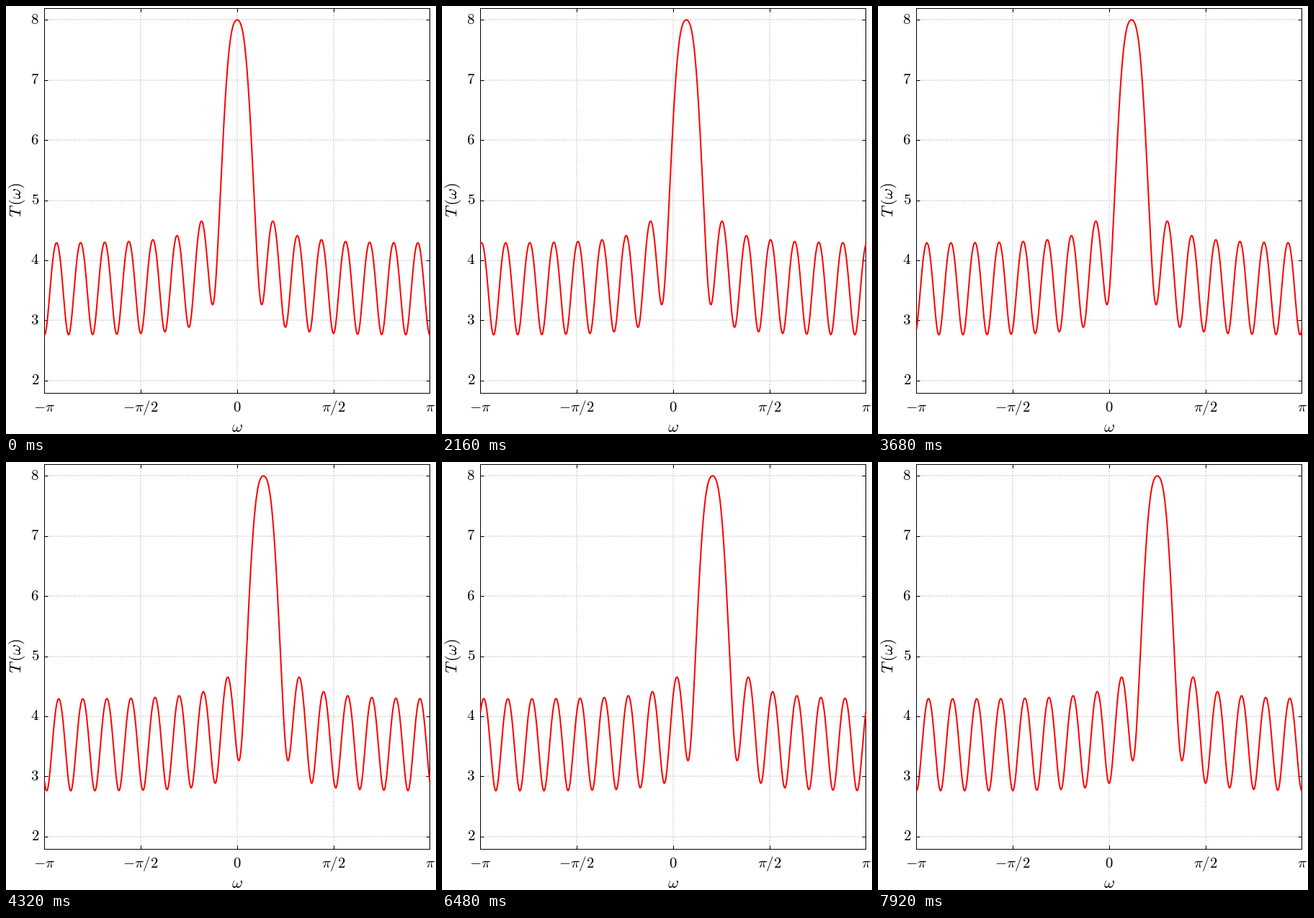
These frames come from a looping animation (597x594 px, 8000 ms). A matplotlib script:

```python
import numpy as np
import matplotlib.pyplot as plt
from matplotlib.animation import FuncAnimation

W, H, DPI = 597, 594, 100
FRAMES, INTERVAL = 100, 80
# Plot box in pixels, just off the half pixel so that lines snap one way.
LEFT, RIGHT, TOP, BOTTOM = 53.45, 588.45, 2.55, 536.55
TICK_PX, LABEL_PX = 20.8, 22.9

plt.rcParams["mathtext.fontset"] = "cm"


def pt(px):
    return px * 72 / DPI


def response(w):
    """Peak of height 8 at w = 0 with sixteen ripples per turn."""
    w = w + 1e-6  # step off the removable singularity
    s2 = np.sin(8 * w) ** 2
    cot2 = 1 / np.tan(w / 2) ** 2
    lobe = s2 * cot2 / 256
    skirt = (1 - lobe) ** 2 * cot2 * (0.122 - 0.042 * s2)
    return np.sqrt(7.62 + 10.8 * s2 + 56.38 * lobe + skirt)


fig = plt.figure(figsize=(W / DPI, H / DPI), dpi=DPI, facecolor="white")
ax = fig.add_axes([LEFT / W, 1 - BOTTOM / H, (RIGHT - LEFT) / W, (BOTTOM - TOP) / H])
ax.set_xlim(-np.pi, np.pi)
ax.set_ylim(1.8, 8.2)

x_ticks = np.linspace(-np.pi, np.pi, 5)
y_ticks = np.arange(2, 9)
ax.set_xticks(x_ticks)
ax.set_yticks(y_ticks)
ax.tick_params(direction="in", top=True, right=True, length=pt(5),
               width=pt(1), labelbottom=False, labelleft=False)
ax.set_axisbelow(True)
ax.grid(color="#dadada", linewidth=pt(1.8), linestyle=(0, (1, 0.9)))
for spine in ax.spines.values():
    spine.set_linewidth(pt(1))


def label(x, y, text, size=TICK_PX, **style):
    """Place text with its baseline at a pixel measured from the top left."""
    style = {"ha": "center", "va": "baseline", **style}
    fig.text(x / W, 1 - y / H, text, fontsize=pt(size), **style)


x_names = [r"$-\pi$", r"$-\pi/2$", r"$0$", r"$\pi/2$", r"$\pi$"]
for x, name in zip(np.linspace(LEFT, RIGHT, 5), x_names):
    label(x, 563, name)
for value in y_ticks:
    y = BOTTOM - (value - 1.8) / 6.4 * (BOTTOM - TOP)
    label(46, y + 5.5, f"${value}$", ha="right")
label(320.5, 591, r"$\omega$", LABEL_PX)
label(21, 269, r"$T\,(\omega)$", LABEL_PX, rotation=90, rotation_mode="anchor")

omega = np.linspace(-np.pi, np.pi, 1001)
curve, = ax.plot(omega, response(omega), color="#ff0000", linewidth=pt(2),
                 solid_capstyle="butt", solid_joinstyle="round",
                 clip_on=False, zorder=3)


def update(i):
    center = np.pi / 4 * i / (FRAMES - 1)
    curve.set_ydata(response(omega - center))
    return curve,


anim = FuncAnimation(fig, update, frames=FRAMES, interval=INTERVAL,
                     repeat=True, repeat_delay=0)
plt.show()
```
